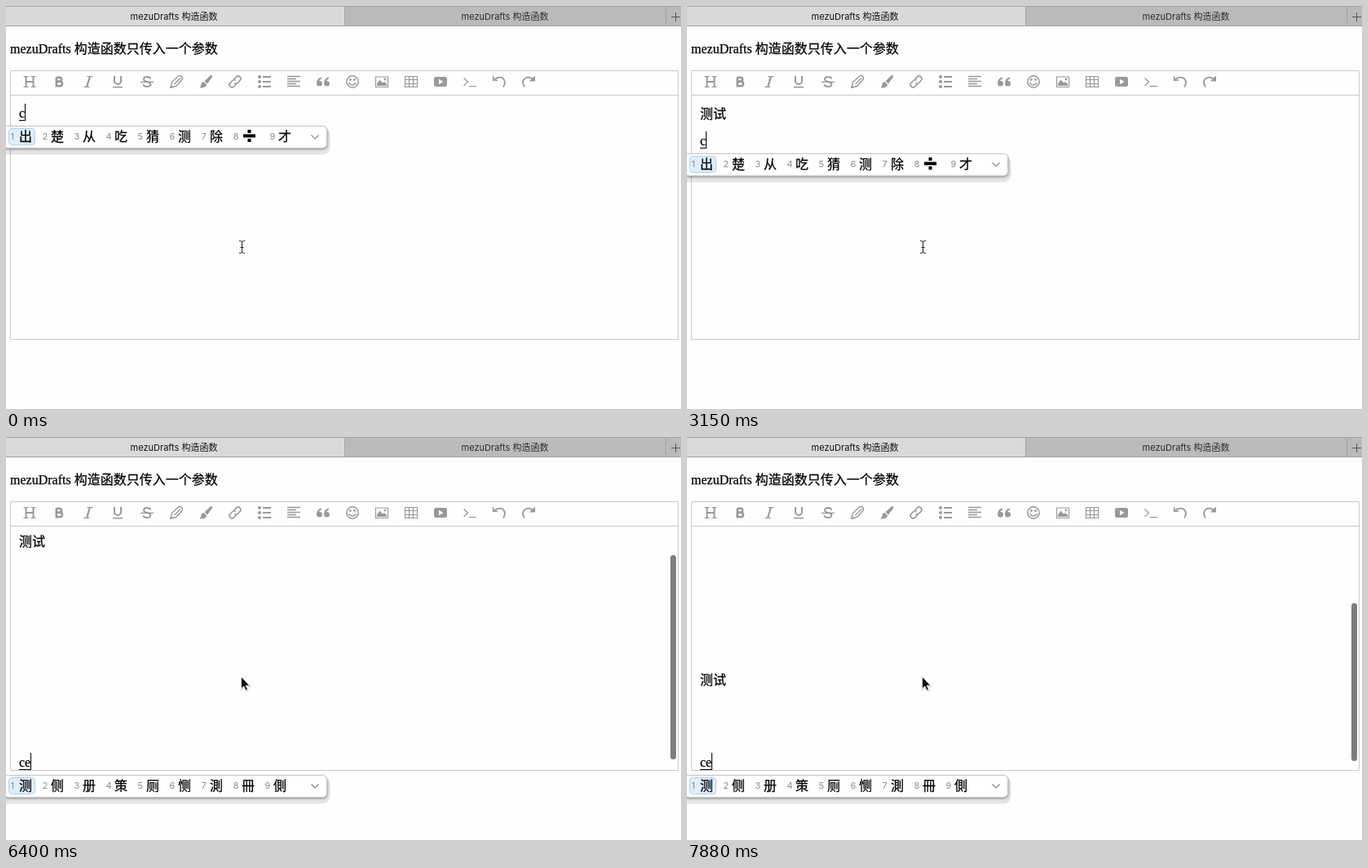
Write an HTML page that moves like this. It is 828x495 px and loops after 8 s.

```html
<!DOCTYPE html>
<html lang="zh-CN">
<head>
<meta charset="utf-8">
<style>
html, body { margin: 0; width: 100%; height: 100%; overflow: hidden; background: #fefefe; }
svg { display: block; }
text { font: 16px 'Liberation Serif', 'Noto Sans CJK SC', 'Noto Sans CJK JP', serif; stroke: #000; stroke-width: .25; }
.tab { font: 11px Inter, 'Noto Sans CJK SC', 'Noto Sans CJK JP', sans-serif; text-anchor: middle; stroke: none; }
.candidate { font-family: 'Noto Sans CJK SC', 'Noto Sans CJK JP', sans-serif; }
.number { font: 11px Inter, sans-serif; fill: #8c8c8c; stroke: none; }
#icons { fill: none; stroke: #999; stroke-width: 1.5; }
#icons .solid { fill: #999; stroke: none; }
</style>
</head>
<body>
<svg width="828" height="495" viewBox="0 0 828 495">
  <clipPath id="view"><path d="M6 110H824V409H6Z"/></clipPath>
  <filter id="soft"><feGaussianBlur stdDeviation="1"/></filter>

  <rect width="415" height="25" fill="#d9d9d9"/>
  <rect x="415" width="413" height="25" fill="#bababc"/>
  <path d="M0 .5H828M0 24.5H828M415.5 0V25M809.5 0V25" stroke="#a4a4a6"/>
  <path d="M816 13.5H827M821.5 8V19" stroke="#555"/>
  <text class="tab" x="206" y="17" fill="#111">mezuDrafts 构造函数</text>
  <text class="tab" x="612" y="17" fill="#2c2c2c">mezuDrafts 构造函数</text>
  <text x="5" y="58">mezuDrafts 构造函数只传入一个参数</text>

  <path d="M5.5 79.5H824.5V409.5H5.5ZM5.5 109.5H824.5" fill="none" stroke="#c9c9c9"/>
  <g id="icons"></g>

  <g clip-path="url(#view)">
    <g id="doc"></g>
    <rect id="caret" width="1" height="21"/>
  </g>
  <rect id="thumb" x="815" width="7" rx="3.5" fill="#7d7d7d"/>

  <g id="popup">
    <rect x="-6" y="2" width="403.5" height="33.5" rx="9" fill="#000" opacity=".1"/>
    <rect x="-4" y="1" width="398.5" height="28.5" rx="6" fill="#000" opacity=".3" filter="url(#soft)"/>
    <rect x="-2.5" y=".5" width="396" height="27" rx="5" fill="#fff" stroke="#c4c4c4"/>
    <rect id="chosen" x="3.5" y="3.5" height="20" rx="4" fill="#dfedfc" stroke="#acd0f5"/>
    <g id="candidates"></g>
    <path d="M374.5 11.5l4.5 4.5 4.5-4.5" fill="none" stroke="#888" stroke-width="1.2"/>
  </g>

  <path id="beam" d="M286 288.5h1.5q2 0 2 2v11q0 2-2 2H286M293 288.5h-1.5q-2 0-2 2v11q0 2 2 2H293M287.5 296.5h4" fill="none" stroke="#222"/>
  <g id="arrow">
    <path d="M289 296v14l3.2-3 2.4 5 2.2-1-2.3-4.8h4.5z" stroke="#000" stroke-width="2" opacity=".15"/>
    <path d="M288.5 294.5v14.5l3.3-3 2.3 5.2 2.3-1-2.3-5h4.6z" stroke="#fff" stroke-width=".8"/>
  </g>
</svg>
<script>
const $ = id => document.getElementById(id);
const show = (id, visible) => $(id).style.display = visible ? '' : 'none';

// Toolbar icons, each drawn around its own centre.
const line = (d, width = 1.5) => `<path d="${d}" stroke-width="${width}"/>`;
const solid = d => `<path class="solid" d="${d}"/>`;
const quoteMark = x => solid(`M${x} 2a3.5 3.5 0 1 0 7 0a3.2 3.2 0 0 0-4-3q.6-2 3-2.6v-2q-6 1-6 7.6z`);
const turn = line('M-6.5-2.5Q-1-7 4-4.5Q9.5-.5 5 6.5', 1.8);
const chain = line('M-1 3.2H-5.2a3.2 3.2 0 0 1 0-6.4H-1.5Q1-3.2 1.8-.8M1-3.2H5.2a3.2 3.2 0 0 1 0 6.4H1.5Q-1 3.2-1.8 .8', 1.6);
const icons = [
  line('M-4.5-6V6M4.5-6V6M-4.5 0H4.5', 2) + line('M-7.5-6.3h6M1.5-6.3h6M-7.5 6.3h6M1.5 6.3h6', 1.2),
  line('M-3.2-5.3V5.3H1.2a2.8 2.8 0 0 0 0-5.7H-3M.6-.4a2.45 2.45 0 0 0 0-4.9H-3.2', 2.6),
  line('M1.8-6L-1.8 6', 2.2) + line('M-1.5-6.3h7M-5.5 6.3h7', 1.3),
  line('M-4-7V-1a4 4 0 0 0 8 0V-7', 2) + line('M-6 6.6H6', 1.6),
  line('M4.3-3.5Q3.5-6 0-6Q-4-6-4-3.2Q-4-.8 0 0Q4.4 .8 4.4 3.2Q4.2 6 0 6Q-4 6-4.6 3.2', 1.9) + line('M-8 .4H8', 1.3),
  line('M-7 7L-5.5 .5L2-6.5Q4.5-8.5 6.5-6.5Q8.5-4.5 6.5-2L-.5 5.5ZM-2.5 3L5-4.5', 1.4) + solid('M-8 8l1-4l3 3z'),
  solid('M7.6-8Q8.8-7 7.5-5L2 2.5L-1.5-.8L5-7Q6.5-8.5 7.6-8ZM-2.5 0L1.2 3.6Q0 8-7.8 7.4Q-5.8 6-5.6 3Q-5 .2-2.5 0Z'),
  `<g transform="rotate(-45)">${chain}</g>`,
  [-6, 0, 6].map(y => solid(`M-8 ${y}a2 2 0 1 0 4 0a2 2 0 1 0-4 0`) + line(`M-2 ${y}H8`, 2)).join(''),
  line('M-8-6.5H8M-8-3.5H3M-8-.5H8M-8 2.5H3M-8 5.5H8', 1.6),
  quoteMark(-8) + quoteMark(1),
  '<circle r="7.2"/>' + solid('M-4-2.5a1.4 1.4 0 1 0 2.8 0a1.4 1.4 0 1 0-2.8 0M1.2-2.5a1.4 1.4 0 1 0 2.8 0a1.4 1.4 0 1 0-2.8 0') + line('M-4.5 1.5Q0 7 4.5 1.5'),
  line('M-7.5-6H7.5V6.5H-7.5Z', 1.2) + solid('M-6 5V2.5L-2.5-2.5L1 1.5L3 0L6 3V5ZM2.5-3a1.4 1.4 0 1 0 2.8 0a1.4 1.4 0 1 0-2.8 0'),
  line('M-7.5-6.5H7.5V6.5H-7.5ZM-7.5-2.5H7.5M-7.5 2.5H7.5M-2.5-6.5V6.5M2.5-6.5V6.5', 1.2),
  '<rect class="solid" x="-8" y="-6" width="16" height="12" rx="2.5"/><path d="M-2-3.2L3.5 0L-2 3.2Z" fill="#fff" stroke="none"/>',
  line('M-7.5-4.5L-2.5 .3L-7.5 5M-1 5.7H8', 1.3),
  turn + line('M-7.3-7V-1.7H-2', 1.6),
  `<g transform="scale(-1 1)">${turn + solid('M-8-7.5v7h7z')}</g>`
];
$('icons').innerHTML = icons.map((icon, i) => `<g transform="translate(${29 + 36 * i} 93)">${icon}</g>`).join('');

const LOOP = 8000, ROW = 34, VIEW = 299, TRACK = 295;
const typedAt = { 0: 600, 1: 3740, 9: 6700 };
const blinks = [[1200, 1650], [2400, 3000]];

// [time, caret row, pinyin being composed]
const steps = [
  [0, 0, 'c'], [150, 0, 'ce'], [450, 0, 'ce shi'], [600, 0], [1950, 1],
  [3150, 1, 'c'], [3300, 1, 'ce'], [3450, 1, 'ce s'], [3600, 1, 'ce shi'], [3740, 1],
  [4030, 2], [4330, 3], [4470, 4], [4610, 5], [4760, 6], [4900, 7], [5500, 8], [5800, 9],
  [6250, 9, 'c'], [6400, 9, 'ce'], [6550, 9, 'ce shi'], [6700, 9],
  [6990, 10], [7140, 11], [7290, 12], [7590, 12, 'c'], [7880, 12, 'ce']
];

const choices = {
  c: [...'出楚从吃猜测除÷才'],
  ce: [...'测侧册策厕恻測冊側']
};
const phraseChoices = ['测试', ...'测侧册策厕恻測'];

function drawPopup(pinyin, top) {
  const words = choices[pinyin] || phraseChoices;
  let x = 6;
  $('candidates').innerHTML = words.map((word, i) => {
    const left = x + 10;
    x += word === '÷' ? 45 : 23 + 16 * word.length;
    const glyph = word === '÷'
      ? `<path d="M${left + 2} 10.5h15v4h-15zM${left + 7.5} 5h4v4h-4zM${left + 7.5} 16h4v4h-4z"/>`
      : `<text class="candidate" x="${left}" y="19">${word}</text>`;
    return `<text class="number" x="${left - 10.5}" y="17">${i + 1}</text>${glyph}`;
  }).join('');
  $('chosen').setAttribute('width', 16 + 16 * words[0].length);
  $('popup').setAttribute('transform', `translate(0 ${top})`);
}

function drawStep([time, row, pinyin]) {
  const committed = typedAt[row] <= time;
  const scroll = Math.max(0, row * ROW - 268) + (committed && row > 8 ? 13 : 0);
  const rowTop = i => 120 + ROW * i - scroll;

  $('doc').innerHTML = Object.keys(typedAt).filter(i => typedAt[i] <= time)
    .map(i => `<text x="16" y="${rowTop(i) + 18}">测试</text>`).join('');

  let caretX = committed ? 48 : 16;
  if (pinyin) {
    $('doc').innerHTML += `<text id="pinyin" x="16" y="${rowTop(row) + 17}">${pinyin}</text>`;
    caretX = Math.floor(16 + $('pinyin').getComputedTextLength());
    $('doc').innerHTML += `<path d="M16 ${rowTop(row) + 20.5}H${caretX}" stroke="#000"/>`;
    drawPopup(pinyin, rowTop(row) + 27);
  }
  show('popup', pinyin);
  $('caret').setAttribute('x', caretX);
  $('caret').setAttribute('y', rowTop(row));

  const height = 44 + ROW * row;
  const thumb = TRACK * VIEW / height;
  show('thumb', height > VIEW);
  if (height > VIEW) {
    $('thumb').setAttribute('y', Math.round(112.6 + scroll * (TRACK - thumb) / (height - VIEW)));
    $('thumb').setAttribute('height', Math.round(thumb - 1));
  }
}

let current;
function frame() {
  const t = performance.now() % LOOP;
  const step = steps.findLast(([time]) => time <= t);
  if (step !== current) drawStep(current = step);
  show('caret', !blinks.some(([off, on]) => t >= off && t < on));
  show('beam', t < 5050);
  show('arrow', t >= 5050);
  requestAnimationFrame(frame);
}
frame();
</script>
</body>
</html>
```
